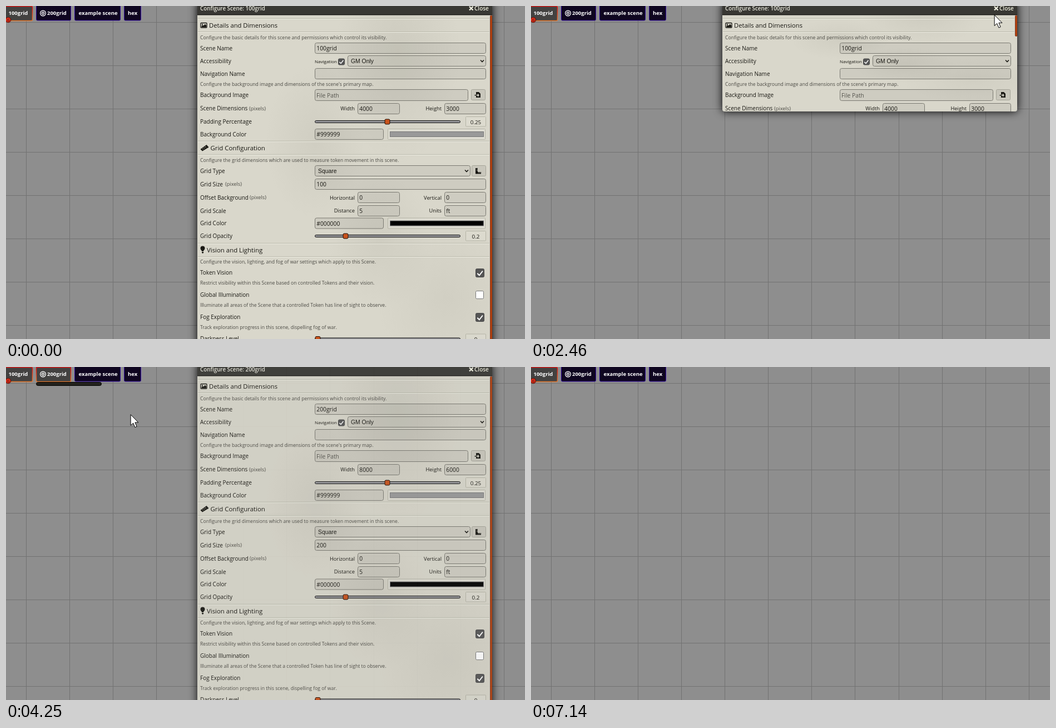
Animation, 933 px wide and 600 px high, one loop 8 s. Source, as an HTML page:

```html
<!DOCTYPE html>
<html lang="en">
<head>
<meta charset="utf-8">
<title>Scene configuration</title>
<style>
html, body { margin: 0; width: 100%; height: 100%; overflow: hidden; background: #8e8e8e; }
#app { position: relative; width: 100%; height: 100%; overflow: hidden; contain: strict; }
svg { position: absolute; left: 0; top: 0; width: 933px; height: 600px; overflow: hidden; }
text { font-family: 'Open Sans', 'Noto Sans', sans-serif; white-space: pre; }
.ui { font-family: 'Liberation Sans', Arial, sans-serif; }
#win {
  position: absolute; left: 344px; top: -8px; width: 530px; overflow: hidden;
  border-radius: 4px; box-shadow: 0 0 16px #000;
  background:
    radial-gradient(ellipse at 68% 12%, rgba(160,158,146,.2), transparent 22%),
    radial-gradient(ellipse at 40% 34%, rgba(160,158,146,.16), transparent 20%),
    radial-gradient(ellipse at 62% 58%, rgba(160,158,146,.16), transparent 20%),
    radial-gradient(ellipse at 85% 72%, rgba(160,158,146,.14), transparent 20%),
    #d9d7cb;
}
#win svg { left: -344px; top: 8px; }
#menu {
  position: absolute; left: 54px; top: 27px; width: 116px; overflow: hidden;
  background: #23221d; border: 1px solid #000; border-radius: 4px;
}
#menu svg { left: -55px; top: -28px; }
#focus { filter: drop-shadow(0 0 1.5px rgba(255,0,0,.6)); }
.glow { filter: drop-shadow(0 0 2.5px #f00); }
</style>
</head>
<body>
<div id="app">
  <svg id="stage"></svg>
  <div id="menu"></div>
  <div id="win"></div>
  <svg><path id="cursor" fill="#fff" stroke="#000" stroke-linejoin="round"/></svg>
</div>
<script>
const $ = id => document.getElementById(id);
const svg = s => `<svg viewBox="0 0 933 600">${s}</svg>`;
const INK = '#191813';

// y is the middle of the capitals
const text = (x, y, s, size = 10, fill = INK, more = '') =>
  `<text x="${x}" y="${y + size * .36}" font-size="${size}" fill="${fill}" ${more}>${s}</text>`;
const rect = (x, y, w, h, fill, stroke = 'none', r = 0, more = '') =>
  `<rect x="${x}" y="${y}" width="${w}" height="${h}" rx="${r}" fill="${fill}" stroke="${stroke}" ${more}/>`;
const path = (d, fill = INK, stroke = 'none', w = 1) =>
  `<path d="${d}" fill="${fill}" stroke="${stroke}" stroke-width="${w}"/>`;
const bold = 'font-weight="600"', right = 'text-anchor="end"', mid = 'text-anchor="middle"';

const label = (y, s, x2) =>
  text(349, y, s) + (x2 ? text(x2, y, '(pixels)', 9.2, '#4b4a44') : '');
const note = (y, s) => text(349, y, s, 8.63, '#4b4a44');
const box = (x, y, w, h = 19) => rect(x + .5, y + .5, w, h, 'rgba(0,0,0,.05)', '#7a7971', 3);
const input = (x, y, w, s, more) => box(x, y, w) + text(x + 3.3, y + 10.5, s, 10.3, INK, more);
const side = (x, y, s) => text(x, y, s, 9.3, INK, right);
const select = (x, y, w, s) => box(x, y, w) +
  text(x + 6, y + 10, s, 10.4, INK, 'class="ui"') +
  path(`M${x + w - 9} ${y + 8.5}l3 3 3-3`, 'none', INK, 1.6);
const button = (x, y) => rect(x + .5, y + .5, 25, 19, 'rgba(0,0,0,.07)', '#a5a498', 2);
const rule = y => rect(345, y, 524, 1, '#b9b8aa') + rect(345, y + 1, 524, 1, '#efeee4');
const slider = (y, x, value) =>
  rect(555.5, y - 2, 261, 4, '#96969a', '#111', 2) +
  rect(x - 4.5, y - 4.5, 9, 9, '#c9531c', '#1d0d05', 2) +
  rect(826.5, y - 9, 36, 17.5, 'rgba(255,255,240,.1)', '#b5b4a6', 1) +
  text(844.5, y + .5, value, 9.8, INK, mid);
const swatch = (y, c) => rect(686.5, y + .5, 175, 19, 'rgba(255,255,255,.15)', '#b5b4a6', 1) +
  rect(690.5, y + 5.5, 168, 9, c, '#777');
const check = (x, y, s, on) =>
  rect(x + .5, y + .5, s, s, on ? '#555' : '#fff', on ? '#4a4a4a' : '#777', 2) +
  (on ? path(`M${x + s * .22} ${y + s * .58}l${s * .24} ${s * .24} ${s * .4} ${-s * .52}`,
    'none', '#fff', s * .13) : '');

function sheet(grid, w, h) {
  return svg(
    rect(344, -8, 530, 24, '#393834') + rect(344, 15, 530, 1.5, '#1b1a17') +
    text(349, 4, `Configure Scene: ${grid}grid`, 9.8, '#e8e7dc', bold) +
    `<g id="close">${path('M833 1l6.5 6.5m0-6.5l-6.5 6.5', 'none', '#f0f0e0', 2.4)}` +
    text(842, 4, 'Close', 10, '#f0f0e0', bold) + '</g>' +
    [22, 46, 243, 267, 427, 451].map(rule).join('') +

    rect(350, 30.5, 11, 8.5, 'none', INK, 1, 'stroke-width="1.3"') +
    path('M351.5 38v-2l2-2 1.5 1.5 3-3 2 2.5v3z') + '<circle cx="353" cy="33" r="1"/>' +
    text(365, 35, 'Details and Dimensions', 11.2) +
    note(57, 'Configure the basic details for this scene and permissions which control its visibility.') +
    label(76, 'Scene Name') + input(555, 66, 307, grid + 'grid') +
    label(99.5, 'Accessibility') + text(555, 100.5, 'Navigation', 8) +
    check(597, 94.5, 11, true) + select(614, 89, 248, 'GM Only') +
    label(122, 'Navigation Name') + box(555, 112, 307) +
    note(140.5, 'Configure the background image and dimensions of the scene\'s primary map.') +
    label(160.5, 'Background Image') + box(555, 150, 275, 20) +
    text(558, 161, 'File Path', 10.3, '#56554e') + button(836, 150) +
    path('M845 155h5l3 3v7h-8v-3h3v2l3-3.3-3-3.3v2h-3z') +
    path('M842.5 160.7h4', 'none', INK, 1.6) +
    label(184.5, 'Scene Dimensions', 437) +
    side(627, 185, 'Width') + input(632, 175, 75, w) +
    side(783, 185, 'Height') + input(788, 175, 74, h) +
    label(208, 'Padding Percentage') + slider(208.5, 685.5, '0.25') +
    label(231, 'Background Color') + input(555, 221, 123, '#999999') + swatch(221, '#999') +

    path('M349.5 258l11-8 4 4.5-11.5 7z') +
    path('M353 256.5l1.5 2m1-3.8l1.5 2m1-3.8l1.5 2', 'none', '#d8d7ca', .8) +
    text(367.5, 256, 'Grid Configuration', 11.4) +
    note(278, 'Configure the grid dimensions which are used to measure token movement in this scene.') +
    label(297.5, 'Grid Type') + select(555, 287, 279, 'Square') + button(837, 287) +
    path('M844 292h4v7h6v3.5h-10z') +
    path('M846 294h2m-2 2.5h2m2 2.5v2m2.5-2v2', 'none', '#d8d7ca', .7) +
    label(321, 'Grid Size', 394) +
    rect(555.5, 311.5, 307, 19, 'none', '#f0483e', 3, 'id="focus"') +
    rect(558, 314, 0, 13, '#757575', 'none', 0, 'id="sel"') + input(555, 311, 307, grid, 'id="size"') +
    label(345, 'Offset Background', 438) +
    side(627, 345.5, 'Horizontal') + input(632, 335, 75, 0) +
    side(783, 345.5, 'Vertical') + input(788, 335, 74, 0) +
    label(369, 'Grid Scale') + side(627, 369, 'Distance') + input(632, 359, 75, 5) +
    side(783, 369, 'Units') + input(788, 359, 74, 'ft') +
    label(391.5, 'Grid Color') + input(555, 381.5, 123, '#000000') + swatch(381.5, '#000') +
    label(414, 'Grid Opacity') + slider(414.5, 610.5, '0.2') +

    path('M352 442c0-2-2.5-2.5-2.5-5.5a4 4 0 0 1 8 0c0 3-2.5 3.5-2.5 5.5zM352 443h3.2v1.5l-1.6 1.5-1.6-1.5z') +
    text(361, 439.5, 'Vision and Lighting', 11.4) +
    note(461, 'Configure the vision, lighting, and fog of war settings which apply to this Scene.') +
    label(480.5, 'Token Vision') + check(844, 473, 15, true) +
    note(498.5, 'Restrict visibility within this Scene based on controlled Tokens and their vision.') +
    label(520, 'Global Illumination') + check(844, 513, 14, false) +
    note(538.5, 'Illuminate all areas of the Scene that a controlled Token has line of sight to observe.') +
    label(560, 'Fog Exploration') + check(844, 553, 15, true) +
    note(578.5, 'Track exploration progress in this scene, dispelling fog of war.') +
    label(599.5, 'Darkness Level') + slider(600, 560.5, '0') +
    rect(870.5, 17, 3.5, 0, '#b8430f', '#6b2410', 1.5, 'id="thumb" stroke-width=".8"'));
}
const sheets = [sheet(100, 4000, 3000), sheet(200, 8000, 6000)];

function drawStage() {
  let lines = '';
  for (let i = 0; i < 12; i++) {
    const p = i * 78.1;
    lines += `M${Math.floor(36.2 + p) + .5} 0v600M0 ${Math.floor(29.1 + p) + .5}h933`;
  }
  const name = (x, s) => text(x, 13, s, 9.5, '#fff', 'font-weight="700"');
  const tab = (x, w) => rect(x + .5, -3, w, 29, '#0f0620', '#3410a0', 2);
  const active = (x, w, id) =>
    rect(x + .5, .5, w, 26, '#434241', 'url(#warm)', 2, `id="${id}" stroke-width="1.5"`);
  $('stage').innerHTML =
    '<linearGradient id="warm" x2="0" y2="1"><stop stop-color="#e01010"/><stop offset="1" stop-color="#e07830"/></linearGradient>' +
    path(lines, 'none', '#727272') +
    active(-5, 52, 'current') + name(4.5, '100grid') +
    '<circle cx="4" cy="25" r="4.7" fill="#e0301c" stroke="#4a0d06"/>' +
    text(4, 25, 'G', 7, '#3a0a05', mid) +
    tab(54, 62) + active(54, 62, 'hot') + name(74, '200grid') +
    '<g fill="none" stroke="#fff" stroke-width="1.4"><circle cx="66.5" cy="13" r="4.8"/><circle cx="66.5" cy="13" r="2"/></g>' +
    tab(123, 82) + name(130.5, 'example scene') + tab(212, 30) + name(219, 'hex');

  const cog = (x, y, r) => `<circle cx="${x}" cy="${y}" r="${r}" fill="none" stroke="#fff" stroke-width="2"/>` +
    `<circle cx="${x}" cy="${y}" r="${r + 1.3}" fill="none" stroke="#fff" stroke-width="1.2" stroke-dasharray="1.5"/>`;
  $('menu').innerHTML = svg(
    `<g id="item">${cog(63.5, 40, 2.4)}${cog(70.5, 36.8, 1.2)}${cog(70.5, 43.2, 1.2)}` +
    text(77, 40, 'Configure', 9.7, '#fff', bold) + '</g>' +
    path('M64.5 59.5h4v4h3l-5 5-5-5h3zM60.5 67h3l3 2.7 3-2.7h3v3.5h-12z', '#fff') +
    text(77, 65, 'Preload Scene', 9.7, '#fff', bold));
}

// pointer route: time, x, y
const route = [
  [220, 700, 556], [460, 640, 400], [620, 590, 320], [700, 588, 320], [1000, 529, 316],
  [1160, 514, 321], [1310, 518, 321], [1470, 742, 86], [1700, 836, 8], [2080, 843, 10],
  [2160, 845, 9], [2400, 845, 9], [2460, 835, 16], [2800, 200, 60], [3020, 98, 22],
  [3200, 98, 22], [3230, 92, 14], [3500, 92, 14], [3750, 105, 37], [4090, 105, 37],
  [4250, 223, 85], [4410, 400, 200], [4600, 590, 320], [4900, 590, 320], [5250, 526, 316],
  [5420, 509, 322], [5590, 515, 322], [5740, 742, 86], [5900, 835, 9], [6350, 845, 9],
  [6520, 846, 15], [6700, 880, 60], [6900, 905, 110], [7060, 909, 130]
];
const shapes = {
  arrow: 'M0 0V19.5L4.6 15.3L7.8 23L11 21.6L7.8 14.2H13.8Z',
  hand: 'M-1.5 1.5C-1.5-.4 1.5-.4 1.5 1.5V6.5L6 7.6C7.4 8 7.6 9 7.3 11L6.3 14.5V17.5H-1.5V15.5L-5 10.5C-5.7 9-4.2 8-3 9.2L-1.5 10.8Z',
  beam: 'M-3-8h6M0-8V8M-3 8h6'
};
const clamp = (v, a, b) => Math.min(b, Math.max(a, v));
const swing = (t, start, span = 200) =>
  .5 - Math.cos(Math.PI * clamp((t - start) / span, 0, 1)) / 2;

function pointerAt(t) {
  const i = route.findIndex(k => k[0] > t);
  if (i < 1) return null;
  const [a, x, y] = route[i - 1], [b, u, v] = route[i], p = (t - a) / (b - a);
  return [x + (u - x) * p, y + (v - y) * p];
}

let shown = -1;
function draw(t) {
  const n = t < 4000 ? 0 : 1;
  const [x, y] = pointerAt(t) || [-99, -99];
  if (n !== shown) $('win').innerHTML = sheets[shown = n];

  const shrink = swing(t, n ? 6420 : 2330);
  const height = 735 * (1 - shrink);
  const alpha = n ? swing(t, 4075, 220) : 1;
  const win = $('win').style;
  win.display = shrink < 1 && alpha > 0 ? 'block' : 'none';
  win.height = height + 8 * (1 - shrink) + 'px';
  win.opacity = alpha;
  $('thumb').setAttribute('height', Math.max(0, height - 17) ** 2 / 852);

  const [click, drag, done] = n ? [4870, 4900, 5250] : [620, 700, 1000];
  const from = t >= done ? 558 : t > drag ? clamp(x, 558, 576) : 576;
  $('focus').style.display = t >= click ? '' : 'none';
  $('sel').setAttribute('x', from);
  $('sel').setAttribute('width', 576 - from);
  $('size').setAttribute('fill', from < 565 ? '#fff' : INK);
  $('size').setAttribute('font-weight', from < 565 ? 600 : 400);

  const onClose = x > 828 && y < 14 && shrink < 1;
  $('close').setAttribute('class', onClose ? 'glow' : '');

  const open = swing(t, 3380) * (1 - swing(t, 4094));
  $('menu').style.display = open > .005 ? 'block' : 'none';
  $('menu').style.height = 48 * open + 'px';
  $('hot').style.display = t >= 3380 && t < 4290 ? '' : 'none';
  $('item').setAttribute('class', x > 55 && x < 171 && y > 28 && y < 52 ? 'glow' : '');

  const onTab = x < 243 && y < 27;
  const inField = alpha > .5 && shrink < 1 && x > 555 && x < 863 && y > 311 && y < 331;
  $('cursor').setAttribute('d', shapes[onClose || onTab ? 'hand' : inField ? 'beam' : 'arrow']);
  $('cursor').setAttribute('transform', `translate(${x} ${y})`);
}

drawStage();
function tick() {
  draw(performance.now() % 8000);
  requestAnimationFrame(tick);
}
tick();
</script>
</body>
</html>
```
